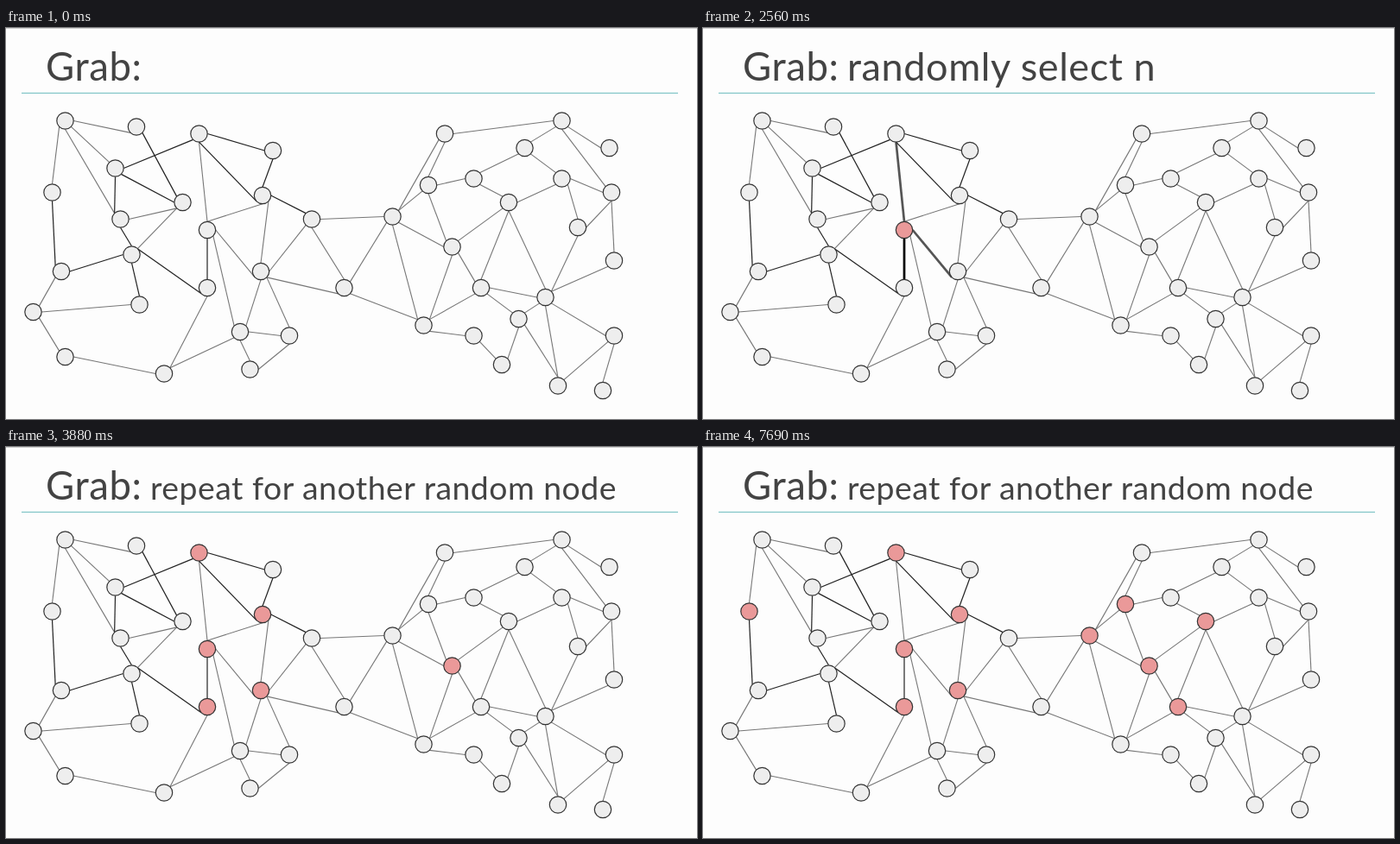
An HTML page for the animation above (8000 ms loop, 800 px wide and 453 px high).

```html
<!DOCTYPE html>
<html lang="en">
<head>
<meta charset="utf-8">
<title>Grab</title>
<style>
  html, body { margin: 0; width: 100%; height: 100%; overflow: hidden; background: #fdfdfd; }
  svg { display: block; width: 100%; height: 100%; }
  text { font-family: Lato, "Open Sans", sans-serif; fill: #434343; letter-spacing: 0.013em; }
  line { stroke: #777; stroke-width: 1.1; }
  line.dark { stroke: #222; stroke-width: 1.2; }
  line.bold { stroke: #555; stroke-width: 2.7; }
  line.dark.bold { stroke: #000; }
  circle { fill: #eee; stroke: #333; stroke-width: 1.2; }
  circle.visited { fill: #ea9999; }
</style>
</head>
<body>
<svg id="stage" viewBox="0 0 800 453">
  <rect width="800" height="453" fill="#fdfdfd"/>
  <rect width="800" height="1" fill="#d2d2d2"/>
  <rect x="18" y="74.8" width="760" height="1.3" fill="#85c7c9"/>
  <text x="46" y="61" font-size="45.5">Grab:</text>
  <text id="step" x="167" y="61"></text>
</svg>
<script>
const LOOP = 8000, RADIUS = 9.7, EIGHTH = Math.PI / 4;
const stage = document.getElementById('stage');
const step = document.getElementById('step');

// Node centres, named A to Z and then a to s.
const names = 'ABCDEFGHIJKLMNOPQRSTUVWXYZabcdefghijklmnopqrs';
const centres = [
  [68.5, 107.5], [151, 114.5], [126.5, 162.5], [53.5, 190.5], [132.5, 221.5],
  [204.5, 202], [145.5, 262.5], [64, 282], [31.5, 329], [154.5, 320.5],
  [68.5, 381], [183, 400.5], [223.5, 122.5], [309, 142], [297, 194],
  [233, 234], [233, 301], [295, 282], [271, 352], [328, 356.5],
  [282.5, 395.5], [354, 221.5], [391.5, 301], [447.5, 218.5], [508, 122.5],
  [489, 182], [541.5, 174.5], [516.5, 253.5], [582, 202], [550, 301],
  [483.5, 344.5], [541.5, 356.5], [574, 390], [593.5, 337], [624.5, 312],
  [643.5, 107.5], [698.5, 139], [600.5, 139], [643.5, 174.5], [701, 190.5],
  [662, 231], [704, 269.5], [704, 356.5], [639, 414.5], [691, 420]
];

// An edge leaves a node at the compass point that faces its partner,
// unless another point is written after the node's name.
const darkEdges = 'B-F C-Msw Cse-Fw C-Enw E-G G-H D-Hnw G-J Gne-Qsw M-N Ms-Osw N-O Oe-V P-Q';
const greyEdges = `A-Bsw Asw-D A-C As-E E-Fsw F-G H-I I-J I-K K-L L-Qs L-S M-P Pn-Os
  Ose-R Pe-Rsw Pse-Snw R-Sne R-Tn Re-V Rse-Wsw S-T S-U Ts-Ue V-X Vs-Wn W-X Wse-e X-Y X-Z
  Ys-Zn Z-a Z-bnw Xse-bw X-enw b-ene b-c b-dnw c-d c-i ce-m a-c a-l j-l l-m Y-j j-kw
  js-n m-n mse-o ns-oe n-p ine-os i-p d-i dsw-e d-h ese-f f-g gne-hs h-i hse-rn is-r
  i-qw q-r q-s`;

const nodes = {};
const lines = {};
const compass = ['e', 'se', 's', 'sw', 'w', 'nw', 'n', 'ne'];

function add(tag, attributes) {
  const el = document.createElementNS('http://www.w3.org/2000/svg', tag);
  for (const name in attributes) el.setAttribute(name, attributes[name]);
  return stage.appendChild(el);
}

function anchor(node, other, side) {
  const facing = Math.round(Math.atan2(other.y - node.y, other.x - node.x) / EIGHTH);
  const angle = EIGHTH * (side ? compass.indexOf(side) : facing);
  return [node.x + RADIUS * Math.cos(angle), node.y + RADIUS * Math.sin(angle)];
}

function addEdges(list, className) {
  for (const edge of list.split(/\s+/)) {
    const [from, to] = edge.split('-');
    const a = nodes[from[0]], b = nodes[to[0]];
    const [x1, y1] = anchor(a, b, from.slice(1));
    const [x2, y2] = anchor(b, a, to.slice(1));
    lines[from[0] + to[0]] = add('line', { x1, y1, x2, y2, class: className });
  }
}

centres.forEach(([x, y], i) => nodes[names[i]] = { x, y });
addEdges(greyEdges, '');
addEdges(darkEdges, 'dark');
for (const node of Object.values(nodes))
  node.circle = add('circle', { cx: node.x, cy: node.y, r: RADIUS });

const titles = [
  { at: 0, text: '' },
  { at: 1190, text: 'pick a node at random' },
  { at: 1880, text: 'view all neighboring nodes' },
  { at: 2440, text: 'randomly select n' },
  { at: 2940, text: 'add these to visited list' },
  { at: 3750, text: 'repeat for another random node', size: 37.4 }
];
const visits = [
  { at: 1190, group: 'P' },
  { at: 2940, group: 'MOQR' },
  { at: 3750, group: 'b' },
  { at: 6060, group: 'XZcd' },
  { at: 7500, group: 'D' }
];
const highlights = [
  { from: 1880, to: 3750, edges: ['MP', 'PQ', 'PR'] },
  { from: 1880, to: 2440, edges: ['PS'] },
  { from: 4560, to: 6750, edges: ['Xb', 'Zb', 'bc', 'bd'] },
  { from: 4560, to: 5380, edges: ['be'] }
];

function render(t) {
  const { text, size = 45 } = titles.filter(title => title.at <= t).pop();
  step.textContent = text;
  step.setAttribute('font-size', size);
  for (const { at, group } of visits)
    for (const name of group) nodes[name].circle.classList.toggle('visited', t >= at);
  for (const { from, to, edges } of highlights)
    for (const edge of edges) lines[edge].classList.toggle('bold', t >= from && t < to);
}

const start = performance.now();
function tick() {
  render((performance.now() - start) % LOOP);
  requestAnimationFrame(tick);
}
tick();
</script>
</body>
</html>
```
